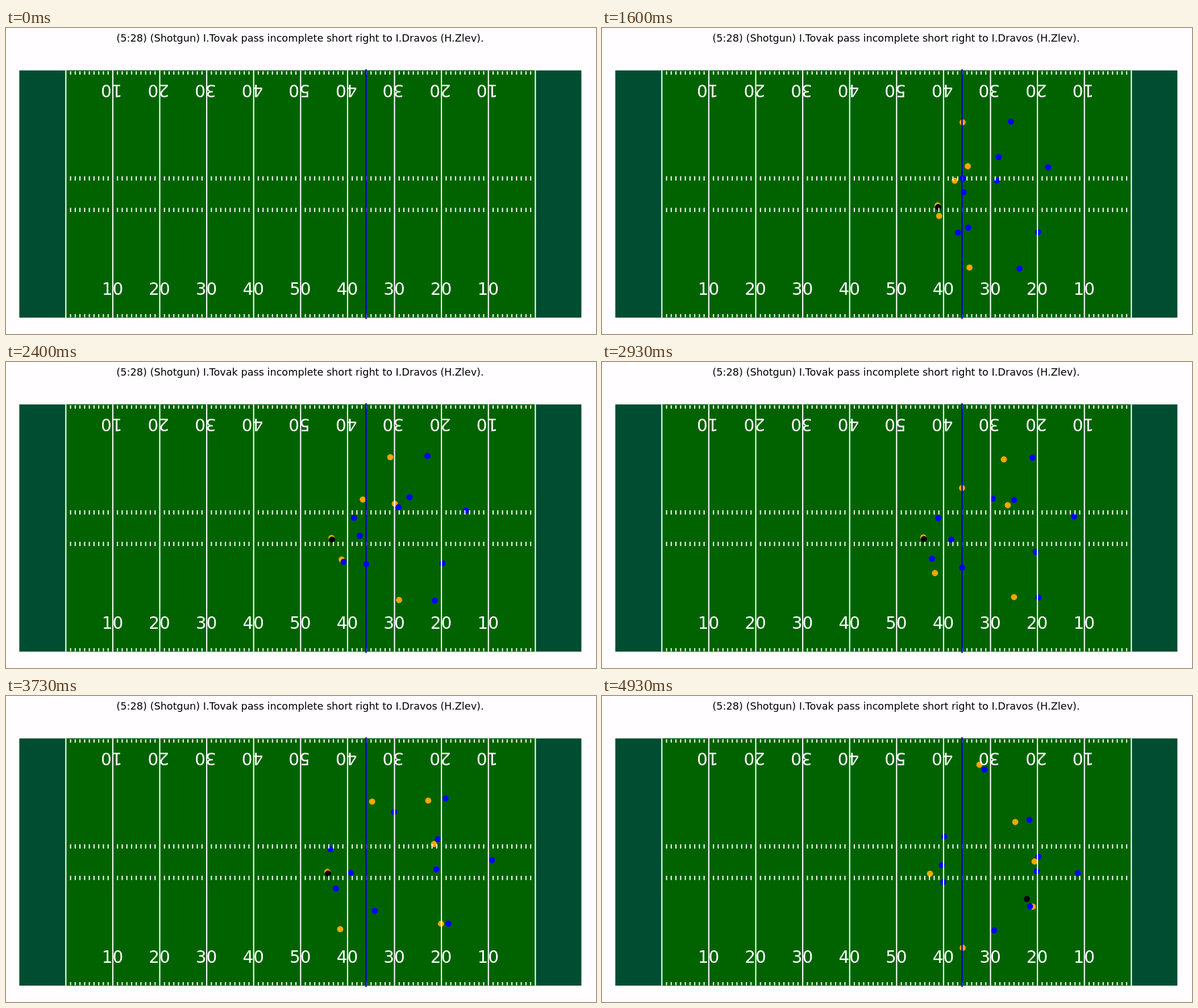
These frames come from a looping animation (1038x539 px, 5.06 s). An HTML page with a canvas:

```html
<!DOCTYPE html>
<html lang="en">
<head>
<meta charset="utf-8">
<title>Pass play</title>
<style>
  html, body { margin: 0; width: 100%; height: 100%; overflow: hidden; background: #fffdff; }
  canvas { display: block; width: 1038px; height: 539px; }
</style>
</head>
<body>
<canvas id="stage" width="1038" height="539"></canvas>
<script>
const ctx = document.getElementById('stage').getContext('2d');
const LOOP = 5060;
const FONT = '"DejaVu Sans", sans-serif';
const TITLE = '(5:28) (Shotgun) I.Tovak pass incomplete short right to I.Dravos (H.Zlev).';
const FIELD = { left: 23.4, right: 1012.3, top: 74.7, bottom: 510.2 };
const ORANGE = '#ffa500', BLUE = '#0000ff', BLACK = '#000000', WHITE = '#ffffff';

// Play times, in steps of a tenth of a second.
const SNAP = 10, CATCH = 15.5, THROW = 38, END = 49;

const yardX = yard => 105.3 + 8.26 * yard;
const clamp = u => Math.min(1, Math.max(0, u));
const smooth = u => u * u * (3 - 2 * u);
const mix = (a, b, u) => a.map((v, axis) => v + (b[axis] - v) * u);
const add = (a, b) => a.map((v, axis) => v + b[axis]);

// A run through points spread evenly from snap to end, starting from rest.
function route(...points) {
  const last = points.length - 1;
  const slope = (i, axis) => {
    const gap = j => points[j + 1][axis] - points[j][axis];
    if (i === 0) return 0;
    if (i === last) return 1.5 * gap(i - 1) - 0.5 * slope(i - 1, axis);
    return (gap(i - 1) + gap(i)) / 2;
  };
  return step => {
    const s = clamp((step - SNAP) / (END - SNAP)) * last;
    const i = Math.min(last - 1, Math.floor(s)), u = s - i;
    return mix(points[i], points[i + 1], smooth(u)).map((v, axis) =>
      v + slope(i, axis) * u * (1 - u) ** 2 - slope(i + 1, axis) * u * u * (1 - u));
  };
}

// A defender who closes his gap to a receiver until a given step.
const mark = (man, from, to, until) => step =>
  add(man(step), mix(from, to, smooth(clamp((step - SNAP) / (until - SNAP)))));

const passer = route([597, 313.5], [565, 309], [577, 313]);
const outside = route([618, 167], [671, 167], [741, 182], [727, 222]);
const slot = route([628, 241], [679, 249], [750, 259], [761, 291.5]);
const target = route([629, 421.5], [686, 420], [763, 403], [758, 371]);
const tightEnd = route([618.5, 276.5], [634, 220], [664, 121]);
const back = route([594, 328.5], [591, 344.5], [586, 407], [634.5, 443.5]);
const offense = [passer, outside, slot, target, tightEnd, back];

const defense = [
  mark(outside, [91, -1], [25, -4], 43),
  mark(slot, [64, -17.5], [6.5, -8.5], 33),
  mark(target, [95, 2], [-5, -0.5], 47),
  route([696, 271.5], [687.5, 239], [673, 129.5]),
  route([776, 238.5], [806, 260], [854, 287], [837, 312]),
  route([765, 356.5], [768.5, 357], [757, 307], [765, 308.5]),
  route([642.5, 258.5], [615, 274], [571, 271], [602, 247.5]),
  route([641, 283], [614, 313], [598, 298]),
  route([649, 351], [634, 363], [690, 413]),
  route([638.5, 363], [580, 346], [600.5, 328])
];

function ball(step) {
  const hands = at => add(passer(at), [1, 3]);
  if (step < CATCH) return mix([627.5, 314.5], hands(CATCH), clamp((step - SNAP) / (CATCH - SNAP)));
  if (step < THROW) return hands(step);
  return mix(hands(THROW), [747.5, 357.5], (step - THROW) / (END - THROW));
}

function dot([x, y], color) {
  ctx.fillStyle = color;
  ctx.beginPath();
  ctx.arc(x, y, 5.4, 0, Math.PI * 2);
  ctx.fill();
}

function vertical(x, top, bottom, width, color = WHITE) {
  ctx.fillStyle = color;
  ctx.fillRect(x - width / 2, top, width, bottom - top);
}

function text(label, x, y, size, color, angle = 0) {
  ctx.save();
  ctx.translate(x, y);
  ctx.rotate(angle);
  ctx.font = size + 'px ' + FONT;
  ctx.textAlign = 'center';
  ctx.fillStyle = color;
  ctx.fillText(label, 0, 0);
  ctx.restore();
}

function drawGrass() {
  const { left, right, top, bottom } = FIELD;
  ctx.fillStyle = '#fffdff';
  ctx.fillRect(0, 0, 1038, 539);
  ctx.fillStyle = '#004d31';
  ctx.fillRect(left, top, right - left, bottom - top);
  ctx.fillStyle = '#006300';
  ctx.fillRect(yardX(0), top, yardX(100) - yardX(0), bottom - top);
}

function drawMarkings() {
  const { top, bottom } = FIELD;
  for (let yard = 0; yard <= 100; yard++) {
    const x = yardX(yard);
    if (yard % 10 === 0) {
      vertical(x, top, bottom, 2.1);
      continue;
    }
    vertical(x, 76.2, 82.2, 2);
    vertical(x, 261.2, 268.7, 2);
    vertical(x, 316.7, 324.2, 2);
    vertical(x, 504, 509.5, 2);
  }
  vertical(633.4, 72.5, 512.5, 2.4, '#0000d0');

  for (let yard = 10; yard < 100; yard += 10) {
    const label = String(50 - Math.abs(50 - yard)), x = yardX(yard);
    text(label, x - 0.5, 470, 29.5, WHITE);
    text(label, x - 2.2, 100, 29.5, WHITE, Math.PI);
  }
  text(TITLE, 517.5, 24, 17.7, BLACK);
}

function draw(now) {
  const t = now % LOOP;
  // Steps alternate between 130 and 70 ms.
  const step = 2 * Math.floor(t / 200) + (t % 200 >= 130 ? 1 : 0);
  drawGrass();
  if (step > 0) {
    for (const at of offense) dot(at(step), ORANGE);
    for (const at of defense) dot(at(step), BLUE);
    dot(ball(step), BLACK);
  }
  drawMarkings();
}

const start = performance.now();
function tick() {
  draw(performance.now() - start);
  requestAnimationFrame(tick);
}
tick();
</script>
</body>
</html>
```
